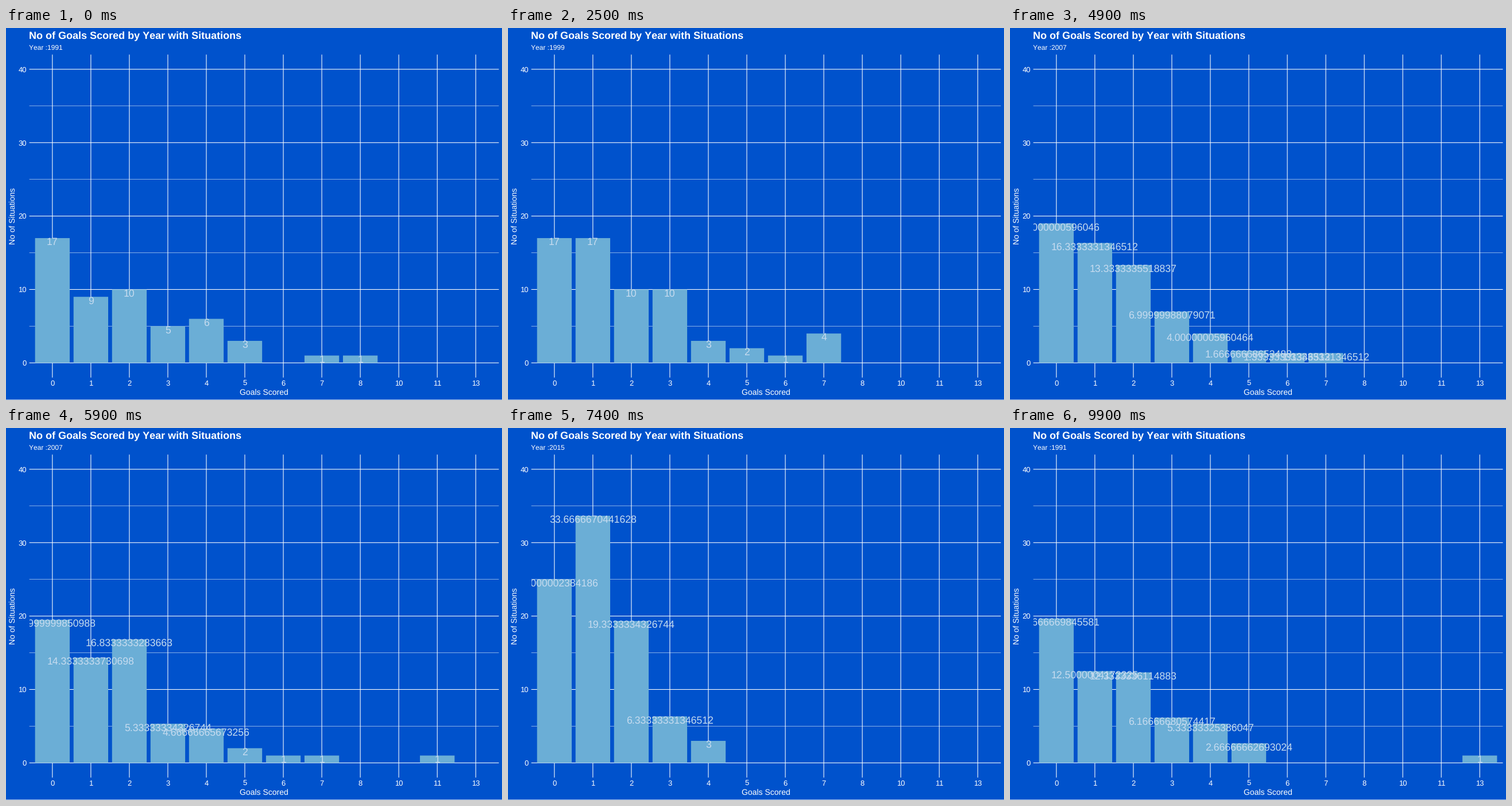
Animation, 864 px wide and 648 px high, one loop 10 s. Source, as a matplotlib script:

```python
import numpy as np
import matplotlib.pyplot as plt
from matplotlib.animation import FuncAnimation
from matplotlib.patches import Rectangle
from matplotlib.transforms import Bbox, TransformedBbox

plt.rcParams.update({
    "font.family": "Liberation Sans",
    "text.hinting": "none",
    "text.kerning_factor": 6,   # no pair kerning
    "toolbar": "None",
})

W, H = 864, 648
BLUE, BAR, PALE = "#0052CC", "#6BAED6", "#C6DBEF"

# Panel edges in pixels, y pointing down
LEFT, RIGHT, TOP, BOTTOM = 40.57, 858.5, 46.3, 608.9
STEP = (RIGHT - LEFT) / 12.2
UNIT = (BOTTOM - TOP) / 44

GOALS = [*range(9), 10, 11, 13]
TWEEN = 6
FRAMES, INTERVAL = 100, 100


def spread(head, last, **stray):
    """Counts per goal: leading bars, a halving tail up to last, stray bars."""
    counts = dict(enumerate(head))
    for goals in range(len(head), last + 1):
        counts[goals] = max(1, round(counts[goals - 1] / 2))
    counts.update({int(key[1:]): n for key, n in stray.items()})
    return [counts.get(goals, 0) for goals in GOALS]


SEASONS = [
    spread([17, 9, 10, 5, 6], 5, g7=1, g8=1),
    spread([14, 11, 10, 10, 3], 8),
    spread([17, 17, 10, 10, 3], 6, g7=4),
    spread([17, 23, 6, 11, 2], 5, g6=2, g7=2),
    spread([20, 13, 17, 5, 5], 7, g11=1),
    spread([17, 21, 16, 7, 3], 4),
    spread([29, 40, 21, 6, 3], 6, g10=2),
    spread([33, 30, 24, 12, 2], 5, g13=1),
]


def x_pos(i):
    return LEFT + (i + 0.6) * STEP


def y_pos(value):
    return BOTTOM - (value + 2) * UNIT


fig = plt.figure(figsize=(W / 72, H / 72), dpi=72, facecolor="white")
ax = fig.add_axes([0, 0, 1, 1])
ax.set_xlim(0, W)
ax.set_ylim(H, 0)
ax.axis("off")
ax.add_patch(Rectangle((0, 0), W, H - 0.6, fc=BLUE, lw=0, snap=False, zorder=0))


def line(xs, ys, width):
    ax.plot(xs, ys, color="white", lw=width, snap=False,
            solid_capstyle="butt", zorder=1)


def write(x, y, text, size, **kw):
    return ax.text(x, y, text, size=size, va="baseline",
                   **{"color": "white", "zorder": 4, **kw})


for v in range(5, 40, 10):
    line([LEFT, RIGHT], [y_pos(v)] * 2, 0.53)
for v in range(0, 50, 10):
    line([LEFT, RIGHT], [y_pos(v)] * 2, 1.07)
    write(35.8, y_pos(v) + 4.65, str(v), 13, ha="right")
for i, goals in enumerate(GOALS):
    line([x_pos(i)] * 2, [TOP, BOTTOM], 1.07)
    write(x_pos(i), 623.2, str(goals), 13, ha="center")

write(40, 18.4, "No of Goals Scored by Year with Situations", 18, weight="bold")
write((LEFT + RIGHT) / 2, 639.2, "Goals Scored", 14, ha="center")
write(16.2, (TOP + BOTTOM) / 2, "No of Situations", 14,
      rotation=90, rotation_mode="anchor", ha="center")
subtitle = write(40, 37.4, "", 12)

panel = TransformedBbox(Bbox([[LEFT, TOP], [RIGHT, BOTTOM]]), ax.transData)
bars, labels = [], []
for i in range(len(GOALS)):
    bar = Rectangle((x_pos(i) - 0.45 * STEP, y_pos(0)), 0.9 * STEP, 0,
                    fc=BAR, lw=0, snap=False, zorder=2)
    bars.append(ax.add_patch(bar))
    label = write(0, 0, "", 17.6, ha="center", color=PALE, clip_on=True)
    label.set_clip_box(panel)
    labels.append(label)


def start(i):
    """First frame of the move away from season i; later holds are shorter."""
    return min(7 + 13 * i, 11 + 12 * i)


def state(frame):
    """Return the season left, the season approached and the steps taken."""
    moved = sum(start(i) <= frame for i in range(len(SEASONS)))
    if moved == 0:
        return 0, 0, TWEEN
    step = min(frame - start(moved - 1) + 1, TWEEN)
    return moved - 1, moved % len(SEASONS), step


def tween(a, b, step):
    """Shared bars move; bars in one season only switch at the last step."""
    if step == TWEEN:
        return b
    if a and b:
        # single precision progress shows up in the label digits
        return a + (b - a) * float(np.float32(step / TWEEN))
    return a


def draw(frame):
    old, new, step = state(frame)
    subtitle.set_text(f"Year :{1991 + 4 * (new if step > TWEEN / 2 else old)}")
    for i, (a, b) in enumerate(zip(SEASONS[old], SEASONS[new])):
        value = tween(a, b, step)
        bars[i].set_visible(value > 0)
        labels[i].set_visible(value > 0)
        bars[i].set_height(y_pos(value) - y_pos(0))
        labels[i].set_text(f"{value:.15g}")
        labels[i].set_position((x_pos(i), y_pos(value) + 12.2))
    return [subtitle, *bars, *labels]


anim = FuncAnimation(fig, draw, frames=FRAMES, interval=INTERVAL,
                     init_func=lambda: draw(0), repeat=True, repeat_delay=0)
plt.show()
```
